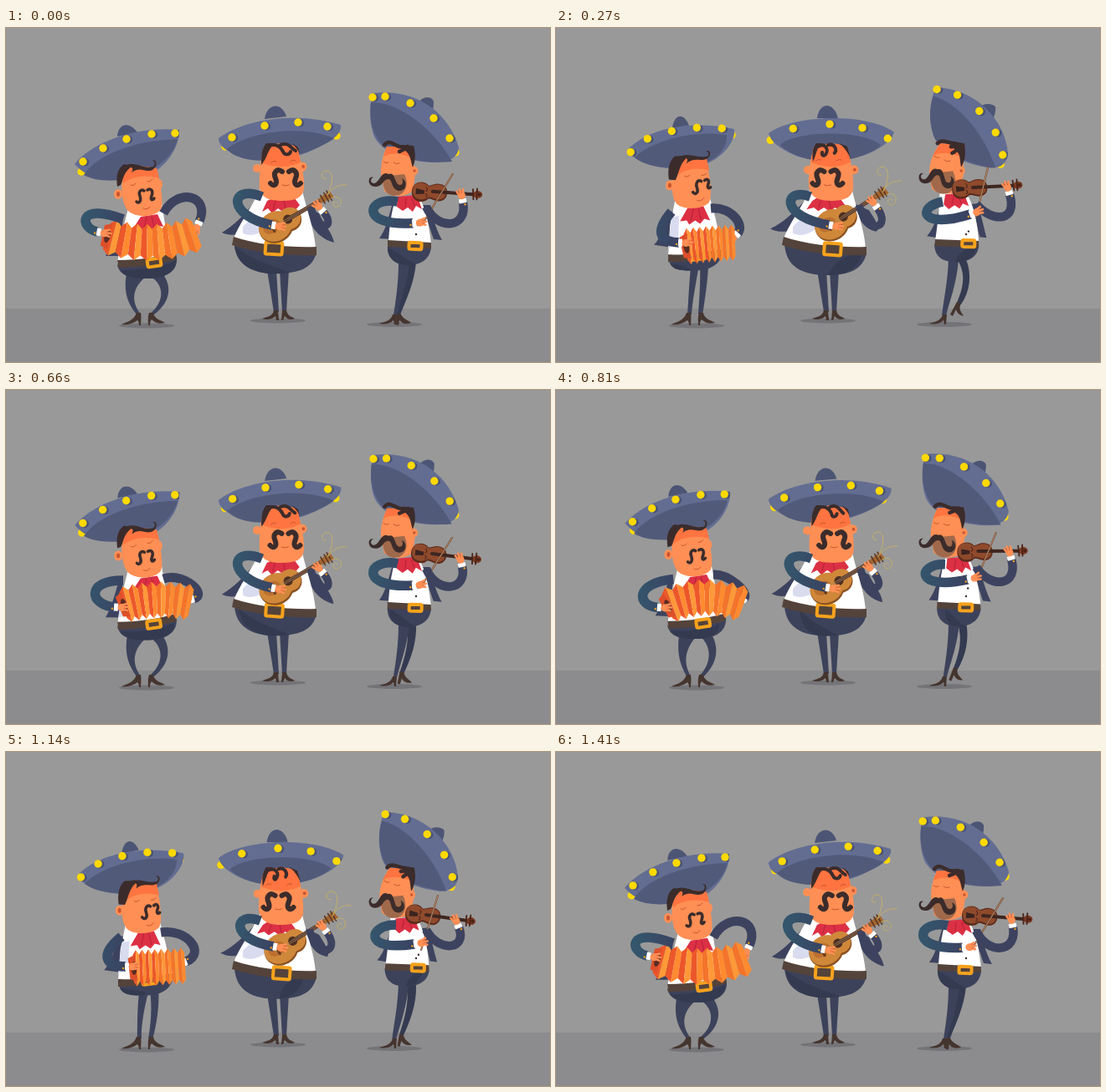
An HTML page with a canvas for the animation above (1440 ms loop, 650 by 400 pixels).

```html
<!DOCTYPE html>
<html lang="en">
<head>
<meta charset="utf-8">
<title>Mariachi trio</title>
<style>
html, body { margin: 0; width: 100%; height: 100%; overflow: hidden; background: #999; }
canvas { display: block; }
</style>
</head>
<body>
<canvas id="stage" width="650" height="400"></canvas>
<script>
const ctx = document.getElementById('stage').getContext('2d');
const LOOP = 1440, BEAT = 720, STEP = 30;
const KEYS = [-15, 270, 510, 660, 960, 1140];
const NUMBER = /-?\d*\.?\d+/g;
const SKIN = '#ff8f55', BROW = '#ff7440', HAIR = '#3b2c2b', WHITE = '#fff', RED = '#dc3044',
  SUIT = '#3d435f', PANTS = '#3d425b', DARK = '#343a50', BELT = '#54433a', GOLD = '#f6a21d',
  SHOE = '#45352f', RIM = '#636d92', UNDER = '#525a7a', CROWN = '#4d5575', LINE = '#c8552f';
let time = 0, up = 0;

const lerp = (a, b, k = up) => a + (b - a) * k;
const numbers = s => s.match(NUMBER).map(Number);
const ease = k => (1 - Math.cos(Math.PI * k)) / 2;

// Rise quickly, sink a little slower, once per beat.
function bounce(t) {
  const b = t % BEAT;
  return b < 315 ? ease(b / 315) : 1 - ease((b - 315) / (BEAT - 315));
}

// Replace every number of the first path by f(values at that place in all paths).
function combine(poses, f) {
  const values = poses.map(numbers);
  let i = 0;
  return poses[0].replace(NUMBER, () => {
    const v = f(values.map(row => row[i]));
    i++;
    return v.toFixed(2);
  });
}
const morph = (a, b = a, k = up) => combine([a, b], ([p, q]) => lerp(p, q, k));

// Periodic Hermite curve through poses placed at KEYS.
function keyed(...poses) {
  const n = KEYS.length;
  const t = time >= LOOP + KEYS[0] ? time - LOOP : time;
  const when = i => KEYS[(i + n) % n] + Math.floor(i / n) * LOOP;
  let i = n - 1;
  while (KEYS[i] > t) i--;
  const d = when(i + 1) - when(i), s = (t - when(i)) / d;
  return combine(poses, v => {
    const at = j => v[(j + n) % n];
    const slope = j => (at(j + 1) - at(j - 1)) / (when(j + 1) - when(j - 1)) * d;
    const r = 1 - s;
    return at(i) * (1 + 2 * s) * r * r + slope(i) * s * r * r
      + at(i + 1) * s * s * (3 - 2 * s) - slope(i + 1) * s * s * r;
  });
}

function fill(color, a, b, k) {
  ctx.fillStyle = color;
  ctx.fill(new Path2D(morph(a, b, k)));
}
function line(color, width, a, b, k) {
  ctx.strokeStyle = color;
  ctx.lineWidth = width;
  ctx.stroke(new Path2D(morph(a, b, k)));
}
function oval(color, x, y, rx, ry = rx, angle = 0) {
  ctx.fillStyle = color;
  ctx.beginPath();
  ctx.ellipse(x, y, rx, ry, angle, 0, 7);
  ctx.fill();
}
function placed(x, y, angle, draw) {
  ctx.save();
  ctx.translate(x, y);
  ctx.rotate(angle);
  draw();
  ctx.restore();
}
function buckle(x, y, w, h, angle) {
  placed(x, y, angle, () => {
    ctx.strokeStyle = GOLD;
    ctx.lineWidth = 4;
    ctx.fillStyle = BELT;
    ctx.beginPath();
    ctx.roundRect(-w / 2 + 2, -h / 2 + 2, w - 4, h - 4, 1.5);
    ctx.fill();
    ctx.stroke();
  });
}
function teal(x0, x1) {
  const g = ctx.createLinearGradient(x0, 0, x1, 0);
  g.addColorStop(0, '#34566c');
  g.addColorStop(1, '#3a4262');
  return g;
}
// Sleeve with cuff and hand following the end of the curve.
function arm(color, width, path) {
  ctx.lineCap = 'butt';
  line(color, width, path);
  const [cx, cy, x, y] = numbers(path).slice(-4);
  placed(x, y, Math.atan2(y - cy, x - cx), () => {
    oval(GOLD, -3, 2, 1.2);
    line(WHITE, 9, 'M-1 0L4 0');
    ctx.lineCap = 'round';
    oval(SKIN, 8.5, 0, 5, 4.5);
    line(SKIN, 2.6, 'M9 -3L14 -5M10 -1L16 -1M10 2L15 3');
    line(LINE, 0.6, 'M11 -2.3L15 -3M11 0.6L15 1');
  });
  ctx.lineCap = 'round';
}
function poms(color, list, dx = 0, dy = 0) {
  for (const [x0, y0, x1, y1] of list) oval(color, lerp(x0, x1) + dx, lerp(y0, y1) + dy, 4.7);
}
function hat(crown, rim, under, hidden, shown) {
  const yellow = '#ffd900';
  fill(CROWN, ...crown);
  poms(yellow, hidden);
  fill(RIM, ...rim);
  fill(UNDER, ...under);
  ctx.save();
  ctx.clip(new Path2D(morph(...rim)));
  poms('#4a5273', shown, 2.5, 0.8);
  ctx.restore();
  poms(yellow, shown);
}
const shadow = (x, y) => oval('#747377', x, y, 33, 3);

function accordion() {
  const [ax, ay, cx, cy, bx, by] = numbers(keyed(
    '120 249 176 266 228 246', '155 262 185 258 214 257', '157 258 185 256 214 254',
    '140 258 180 246 221 255', '132 260 176 238 224 258', '152 259 182 258 214 256'));
  const edge = (s, h) => {
    const r = 1 - s;
    const dx = r * (cx - ax) + s * (bx - cx), dy = r * (cy - ay) + s * (by - cy), d = Math.hypot(dx, dy);
    return [r * r * ax + 2 * r * s * cx + s * s * bx - dy / d * h,
      r * r * ay + 2 * r * s * cy + s * s * by + dx / d * h].map(v => v.toFixed(2));
  };
  const folds = 16, height = i => i % 2 ? 22 : 16;
  for (let i = 0; i < folds; i++) {
    const s = i / folds, e = (i + 1) / folds, h = height(i), g = height(i + 1);
    const color = i % 2 ? (i % 4 === 1 ? '#ff9838' : '#ff8a30') : (i < 7 ? '#ec572a' : '#f4732a');
    fill(color, `M${edge(s, -h)}L${edge(e, -g)}L${edge(e, g)}L${edge(s, h)}Z`);
  }
  const [x, y] = edge(0, 0), tilt = Math.atan2(cy - ay, cx - ax);
  placed(+x, +y, tilt, () => {
    fill('#dd4f2a', 'M-6 -12L2 -16L5 15L-4 13Z');
    oval('#5a2c24', 1, 0, 3.5, 8);
  });
}

function accordionist() {
  shadow(168, 356.5);
  fill(PANTS, 'M144 293C140 318 146 330 156 343L161 343C148 326 152 310 167 298Z',
    'M162 284C160 305 159 325 157 343L162 343C164 325 168 305 171 284Z');
  fill(PANTS, 'M172 297C190 308 190 328 171 343L177 343C197 328 200 308 184 290Z',
    'M172 284C172 305 170 325 170 343L175 343C177 325 180 305 182 284Z');
  fill(SHOE, 'M156 341L161 341C162 347 161 352 161 356L159 356C159 353 158 351 157 350C152 354 145 356 138 355C143 352 153 351 156 341Z');
  fill(SHOE, 'M171 341L176 341C177 349 186 350 190 353C183 355 178 353 174 349C172 351 172 354 172 356L170 356C170 351 169 347 171 341Z');
  fill(SUIT, 'M140 228L134 273L119 273C126 262 130 245 134 232Z', 'M141 218L136 262L117 259C126 250 130 232 134 222Z');
  fill(PANTS, 'M133 284L204 274C206 292 190 300 168 300C148 300 136 296 133 284Z',
    'M134 276L199 270C194 285 182 290 162 290C145 290 138 288 134 276Z');
  fill(DARK, 'M136 290C155 290 185 288 203 278C204 292 190 300 168 300C150 300 140 297 136 290Z',
    'M136 281C150 284 150 285 160 290C160 290 160 290 160 290C145 290 139 288 136 281Z');
  fill(WHITE, 'M146 216L186 210L190 235L203 270L133 282L140 240Z', 'M142 206L184 204L190 225L199 266L134 274L136 236Z');
  fill('#d9dcef', 'M140 240L150 238L146 268L134 274Z', 'M138 226L147 224L146 256L134 264Z');
  fill(BELT, 'M133 278C160 278 185 274 203 268L204 277C185 283 160 287 134 287Z',
    'M134 271C155 272 180 268 199 264L200 272C180 277 155 280 134 280Z');
  buckle(lerp(177, 170), lerp(281, 272), 20, 13, -0.14);
  arm(SUIT, 11, keyed('M188 222C205 190 245 200 231 232', 'M185 216C210 214 226 236 217 246',
    'M185 224C214 220 236 248 216 253', 'M188 226C214 218 242 246 224 250',
    'M187 216C202 222 222 238 223 250', 'M185 216C216 211 240 241 215 251'));
  fill(RED, 'M161 226L181 223L188 238L182 237L177 243L170 239L163 243L160 238L152 240Z',
    'M157 215L176 213L184 230L177 228L172 234L166 230L159 235L156 230L148 231Z');
  line('#b3203a', 1, 'M168 227L165 239M174 226L177 238', 'M164 216L161 230M170 216L173 229');

  hat(['M133 130C134 113 148 112 157 125Z', 'M139 120C142 101 153 101 159 116Z'],
    ['M82 163C100 140 150 117 207 122C208 145 185 180 150 180C125 183 100 184 82 163Z',
      'M85 146C110 118 165 110 213 121C216 130 205 150 185 160C160 172 105 172 85 146Z'],
    ['M93 176C108 152 155 134 205 133C200 152 185 165 160 178C140 183 110 186 93 176Z',
      'M94 154C115 134 165 121 204 128C205 140 197 152 185 158C160 170 112 170 94 154Z'],
    [[90, 172, 104, 152], [190, 132, 211, 128]],
    [[92, 160, 89, 148], [116, 144, 109, 132], [144, 133, 138, 123], [174, 127, 168, 119], [202, 126, 198, 120]]);

  oval(SKIN, lerp(134, 136), lerp(199, 188), 5, 6);
  oval(LINE, lerp(134, 136), lerp(199, 188), 2, 3);
  oval(SKIN, lerp(183, 179), lerp(187, 178), 4, 6);
  fill(SKIN, 'M139 178C137 195 139 212 146 219C156 228 178 227 185 217C189 209 184 185 180 168L150 164Z',
    'M139 172C138 190 138 203 144 210C152 218 176 217 183 208C187 198 184 180 180 160L150 153Z');
  fill(BROW, 'M140 176L150 164L180 168L183 180C166 175 150 178 140 186Z', 'M144 166L150 153L180 156L183 170C170 166 155 168 145 176Z');
  fill(HAIR, 'M133 190C131 176 134 168 141 163L150 166C139 174 140 184 137 188Z',
    'M135 181C133 168 136 158 142 153L160 152C148 160 148 172 143 182Z');
  fill(HAIR, 'M140 166C152 157 164 170 176 166C180 161 176 158 174 159C182 155 181 170 172 171C164 172 160 166 150 173C154 166 148 166 140 166Z',
    'M146 154C160 148 170 156 181 153C184 150 182 146 179 148C186 142 187 156 177 157C170 158 164 155 156 162C160 154 154 154 146 154Z');
  line(LINE, 1, 'M149 188Q152 190 155 186M169 184Q172 185 175 181', 'M154 177Q157 179 160 176M174 176Q177 177 180 174');
  line(HAIR, 3.5, 'M165 195C161 192 158 197 160 201C162 207 159 211 156 208M169 194C174 191 176 196 174 201C172 206 175 207 177 204',
    'M174 183C169 180 167 187 169 191C171 197 167 200 164 196M178 182C182 178 184 183 182 187C181 191 183 192 185 190');
  line(LINE, 1, 'M164 216Q168 219 172 214', 'M169 206Q173 208 177 203');
  accordion();
  arm(teal(95, 145), 11.5, keyed('M140 229C84 208 88 240 109 244', 'M138 220C116 246 126 256 147 257',
    'M139 224C112 244 116 259 146 258', 'M140 228C94 228 100 258 130 260',
    'M140 224C98 238 98 259 120 260', 'M138 221C110 244 120 257 143 257'));
}

function guitar() {
  placed(lerp(335, 342), lerp(230, 227), lerp(-0.52, -0.56), () => {
    oval('#8a5122', -15, 1.5, 21, 18.5);
    oval('#8a5122', 4, 1.5, 14, 14);
    oval('#cf873a', -15, 0, 20.5, 17.5);
    oval('#cf873a', 4, 0, 14, 13);
    oval('#bb702e', -19, -2, 11, 8);
    oval('#4d2f22', 2, 0, 5.5);
    line('#6a3c20', 3, 'M-19 -5L-19 5');
    line('#54382d', 5, 'M4 0L47 0');
    line('#b08a60', 0.6, 'M-19 -1L47 -1M-19 1L47 1');
    fill('#a5662f', 'M46 -3L62 -5L63 5L46 3Z');
    line('#5a3826', 1.6, 'M50 -5.5L50 5.5M55 -6L55 6M59 -6.5L59 6.5');
  });
  line('#c3b06a', 1, 'M384 200C391 185 392 171 383 171C375 172 376 182 382 180M385 199C390 191 398 187 407 188M388 204C392 200 402 203 400 210C398 216 390 215 391 210C392 207 396 207 396 210',
    'M391 196C399 181 399 166 390 166C382 167 383 177 389 176M392 194C396 186 404 182 413 183M395 200C399 196 409 199 406 207C404 214 396 213 397 207C398 203 402 204 402 206');
}

function guitarist() {
  shadow(325, 350.5);
  fill(PANTS, 'M312 290L323 290L326 340L320 340Z');
  fill(PANTS, 'M327 290L338 290L335 340L330 340Z');
  fill(SHOE, 'M320 338L325 338L326 350L323 350L322 345C318 349 312 350 306 348C312 346 319 345 320 338Z');
  fill(SHOE, 'M330 338L335 338C336 345 342 346 345 348C340 350 336 349 333 345L331 350L329 350Z');
  fill(SUIT, 'M300 204C285 225 270 238 258 245C266 249 277 248 284 245C294 235 302 225 308 215Z',
    'M300 204C283 222 270 234 256 240C264 245 275 244 281 242C292 233 302 223 308 213Z');
  fill(SUIT, 'M356 212C362 232 368 250 392 257C390 245 380 236 374 222Z', 'M356 210C362 228 366 240 382 243C388 240 382 230 374 218Z');
  fill(PANTS, 'M273 259L371 269C366 288 350 294 322 294C295 294 275 285 273 259Z',
    'M273 259L371 270C366 290 350 296 324 296C295 296 275 287 273 259Z');
  fill(DARK, 'M273 261C290 275 305 280 340 293C328 295 320 294 312 294C290 291 275 280 273 261Z',
    'M371 270C345 272 335 280 324 296C324 296 326 296 328 296C352 295 366 288 371 270Z');
  fill(WHITE, 'M304 192L354 195C360 220 368 240 370 264C340 266 300 262 272 252C278 235 294 215 304 192Z');
  fill('#d9dcef', 'M283 238C290 230 296 226 304 226L312 240C300 248 292 250 283 246Z');
  fill(BELT, 'M272 250C300 260 340 263 371 262L371 272C340 273 300 270 270 260Z');
  buckle(lerp(320, 331), lerp(264, 265), 24, 18, 0.07);
  fill(RED, 'M312 207L318 204L345 204L351 212L344 220L338 215L332 221L325 216L318 222L313 216L306 220Z',
    'M306 207L312 203L339 204L345 212L339 219L333 215L327 220L320 215L313 219L308 215L299 217Z');
  line('#b3203a', 1, 'M322 207L319 217M332 207L334 216', 'M316 207L313 216M326 207L328 216');

  hat(['M309 109C312 89 330 89 335 106Z', 'M312 108C315 88 332 88 337 108Z'],
    ['M254 132C280 112 340 98 400 116C402 128 385 138 365 147C340 158 300 164 265 147C258 143 254 138 254 132Z',
      'M254 126C285 102 375 102 404 125C402 135 385 147 370 152C345 161 305 161 285 152C268 145 256 135 254 126Z'],
    ['M264 145C285 126 350 114 392 132C380 142 340 158 310 159C290 159 272 155 264 145Z',
      'M268 140C285 122 370 122 388 141C372 155 345 160 327 160C305 160 282 153 268 140Z'],
    [[262, 142, 256, 134], [395, 129, 372, 140]],
    [[270, 131, 284, 120], [309, 117, 328, 115], [349, 113, 367, 120], [384, 118, 397, 133]]);

  oval(SKIN, lerp(300, 301), lerp(168, 170), 5);
  oval(SKIN, lerp(354, 356), lerp(166, 170), 5.5);
  oval(LINE, lerp(355, 357), lerp(166, 170), 2);
  fill(SKIN, 'M308 143C304 155 302 180 303 192C305 204 316 207 330 207C346 207 355 203 356 192C357 175 351 155 348 143Q330 134 308 143Z',
    'M308 143C304 155 301 178 302 190C304 203 314 207 328 207C344 207 354 203 355 192C356 175 351 155 348 143Q330 134 308 143Z');
  fill(BROW, 'M308 143L305 161C320 168 340 168 352 160L348 143Q330 134 308 143Z');
  fill(HAIR, 'M305 164C305 150 306 144 311 138L322 138C312 145 313 155 305 164Z',
    'M307 160C306 150 306 145 311 138L317 138C311 144 311 152 307 160Z');
  fill(HAIR, 'M342 138L349 143L351 150C349 146 346 143 342 138Z', 'M338 138L348 142L352 156C348 149 345 143 338 138Z');
  line(HAIR, 4, 'M314 141C322 138 328 142 331 148C333 153 339 152 340 148M328 140C338 136 340 144 346 147',
    'M313 142C322 137 326 146 322 151C319 155 316 152 317 149M325 140C333 138 336 146 332 150C329 154 333 155 335 153');
  line(LINE, 1, 'M317 161Q320 158 323 160M340 160Q343 157 346 159', 'M310 159Q313 156 316 158M335 159Q338 156 341 158');
  placed(lerp(0, -10), 0, 0, () => {
    line(HAIR, 6, 'M330 172C323 167 319 174 322 180C325 187 320 191 316 186M338 172C345 167 349 174 346 180C343 187 348 191 352 186');
    line(LINE, 1, 'M330 188Q334 190 338 188');
  });
  guitar();
  arm(SUIT, 9, morph('M364 214C372 246 396 240 379 220', 'M362 212C372 250 402 240 384 215'));
  arm(teal(275, 325), 11.5, keyed('M306 202C266 186 264 226 318 236', 'M304 202C272 190 266 226 327 236',
    'M305 202C266 187 266 224 318 234', 'M306 202C266 186 264 226 318 237',
    'M304 202C271 190 266 226 327 235', 'M304 202C272 190 266 224 320 233'));
}

function violin() {
  const [x, y, sx, sy] = numbers(keyed('510 196 566 199', '498 191 555 187', '502 199 557 217',
    '509 196 565 202', '499 191 556 186', '502 195 559 202'));
  placed(x, y, Math.atan2(sy - y, sx - x), () => {
    fill('#5d2b1c', 'M-25 1C-25 -13 -9 -13 -5 -7C0 -7 2 -11 10 -9C20 -7 20 9 10 11C2 12 0 8 -5 9C-9 15 -25 15 -25 1Z');
    fill('#8f4a2c', 'M-24 -1C-24 -12 -10 -12 -5 -6C0 -6 3 -10 10 -8C18 -6 18 7 10 9C3 10 0 6 -5 7C-10 12 -24 12 -24 -1Z');
    line('#4a2318', 1, 'M-8 -5Q-5 -2 -8 0M-8 3Q-5 5 -8 7');
    fill('#3a2320', 'M-20 -3L-10 -1L-10 3L-20 4Z');
    line('#3f2620', 4, 'M0 0L48 1');
    oval('#7a3a22', 54, 1, 5.5, 4.5);
    oval('#4a2318', 56, 1, 2);
    line('#4a2318', 1.8, 'M48 -5L49 7M53 -6L53 7');
  });
  const bow = keyed('M498 234L534 175', 'M502 226L516 167', 'M486 246L524 189',
    'M497 234L533 177', 'M504 226L517 168', 'M496 237L516 172');
  line('#6b4029', 2, bow);
  line('#d0a585', 0.8, bow);
}

function violinist() {
  const [lift] = numbers(keyed('0', '1', '0.95', '0.35', '1', '0.3'));
  shadow(464, 355);
  fill(DARK, 'M479 280C478 305 471 325 466 343L471 343C478 325 488 305 490 280Z',
    'M480 278C490 295 487 310 479 329L484 331C495 315 497 295 490 277Z', lift);
  fill(SHOE, 'M466 342L471 342C474 349 480 350 484 353C478 356 473 354 470 350L469 356L466 356Z',
    'M479 328L484 330C480 337 485 341 487 345C482 344 479 341 478 337L474 345L471 343Z', lift);
  fill(PANTS, 'M469 280C469 305 466 325 463 344L467 344C472 325 480 305 482 280Z',
    'M469 276C468 305 463 325 461 344L466 344C471 325 479 305 481 276Z');
  fill(SHOE, 'M462 343L467 343L466 355L464 355L463 350C458 355 452 355 446 354C452 352 460 351 462 343Z');
  fill(SUIT, 'M466 206L463 253L446 252C455 240 457 225 462 210Z', 'M464 206L461 252L443 249C453 238 455 225 460 210Z');
  fill(SUIT, 'M498 212C504 232 508 245 511 253L521 254C513 240 510 225 506 212Z', 'M496 211C502 228 504 242 506 250L514 251C511 238 508 225 504 210Z');
  fill(PANTS, 'M456 260L508 262C507 277 495 284 480 284C465 284 455 275 456 260Z',
    'M452 259L505 262C503 275 492 280 477 280C462 280 452 274 452 259Z');
  fill(DARK, 'M456 262C470 270 476 276 490 283C488 284 484 284 480 284C465 284 455 275 456 262Z',
    'M505 262C490 264 480 270 476 280C476 280 477 280 478 280C492 280 503 275 505 262Z');
  fill(WHITE, 'M466 203L492 200C502 215 506 240 508 259L457 256C458 240 460 220 466 203Z',
    'M458 198L490 198C500 212 504 238 505 257L453 254C455 240 458 220 458 198Z');
  fill(BELT, 'M456 254L508 257L508 264L456 262Z', 'M453 253L505 255L505 263L452 261Z');
  buckle(lerp(489, 493), lerp(261, 258), 19, 12, 0.03);
  oval(HAIR, lerp(492, 493), lerp(236, 244), 1.2);
  oval(HAIR, 490, 247, 1.2);
  fill(RED, 'M468 202L491 200L497 217L490 213L486 220L480 215L474 219L467 214Z',
    'M465 199L487 197L493 213L486 210L482 216L476 212L469 217L463 211Z');
  line('#b3203a', 1, 'M478 204L477 214M485 204L488 213', 'M475 201L473 211M481 201L484 210');

  hat(['M491 92C496 82 508 80 511 88C511 95 510 100 507 105Z', 'M505 97C510 90 522 90 526 95C526 103 524 108 520 113Z'],
    ['M438 78C490 72 528 100 541 143C540 155 530 161 510 161C480 160 450 150 440 130C434 115 434 95 438 78Z',
      'M455 71C500 72 538 110 540 152C538 162 533 168 520 168C490 164 460 150 452 130C445 112 447 85 455 71Z'],
    ['M436 89C470 88 512 122 533 160C505 163 472 158 452 142C436 128 434 105 436 89Z',
      'M452 81C482 90 512 128 525 168C495 165 465 150 453 132C446 115 446 95 452 81Z'],
    [[537, 149, 531, 164]],
    [[438, 83, 456, 73], [453, 82, 481, 80], [483, 90, 507, 100], [511, 108, 526, 126], [530, 132, 534, 153]]);

  fill(SKIN, 'M455 142C448 158 447 170 449 180L452 195C460 203 478 203 486 195L489 175L484 142Z',
    'M459 138C450 150 445 162 446 178L449 192C457 200 475 200 483 192L487 175L487 140Z');
  fill(BROW, 'M455 142L451 154C462 148 476 150 488 158L484 142Z', 'M459 138L450 153C462 147 476 150 487 156L487 140Z');
  fill(HAIR, 'M476 140L487 141C490 152 489 160 486 167C483 158 484 152 476 146Z', 'M476 136L488 138C490 150 489 158 484 167C482 156 484 150 476 146Z');
  oval(SKIN, lerp(488, 484), 171, 4.5, 5);
  oval(LINE, lerp(488, 484), 171, 1.7);
  line(HAIR, 4.5, 'M452 140C458 133 463 140 470 142C477 143 479 140 482 146M470 148C476 146 478 144 480 142',
    'M456 138C462 132 468 138 476 138C484 138 480 147 473 150M472 142C478 142 480 140 484 140');
  line(LINE, 1, 'M451 160Q454 163 457 161M463 161Q466 164 470 162', 'M452 153Q455 156 458 155M464 158Q467 161 471 159');
  fill('#a0694b', 'M450 178C450 198 458 203 470 200C479 196 481 185 476 175Z', 'M447 174C447 195 456 200 468 198C477 194 480 183 474 171Z');
  placed(2, 0, 0, () =>
    fill(HAIR, 'M455 175C446 170 444 187 437 186C433 185 433 180 437 179C430 176 429 190 439 190C449 190 448 181 455 181C460 181 458 194 468 195C477 195 478 183 471 180C474 186 470 190 466 187C462 182 462 172 455 175Z',
      'M454 169C445 164 444 182 437 181C433 180 433 175 437 174C430 171 429 186 439 186C449 186 448 176 454 176C459 176 456 191 466 192C475 192 476 180 469 177C472 183 468 187 464 184C461 178 461 167 454 169Z'));
  violin();
  arm(SUIT, 10.5, keyed('M502 214C516 244 552 240 546 209', 'M502 211C522 234 552 232 542 199',
    'M502 216C512 252 540 250 538 221', 'M502 214C516 246 552 240 545 211',
    'M502 211C522 234 552 232 542 198', 'M502 213C516 240 552 238 541 210'));
  arm(teal(435, 490), 11.5, keyed('M468 208C432 200 420 238 486 234', 'M462 208C430 214 436 242 495 223',
    'M464 206C430 200 426 228 479 239', 'M468 208C432 200 420 238 486 234',
    'M462 209C430 214 436 242 496 222', 'M466 207C434 206 424 240 488 230'));
}

function frame(now) {
  time = Math.floor(now / STEP) * STEP % LOOP;
  up = bounce(time);
  ctx.lineCap = ctx.lineJoin = 'round';
  ctx.fillStyle = '#999';
  ctx.fillRect(0, 0, 650, 336);
  ctx.fillStyle = '#8c8b8d';
  ctx.fillRect(0, 336, 650, 64);
  accordionist();
  guitarist();
  violinist();
  requestAnimationFrame(frame);
}
frame(0);
</script>
</body>
</html>
```
